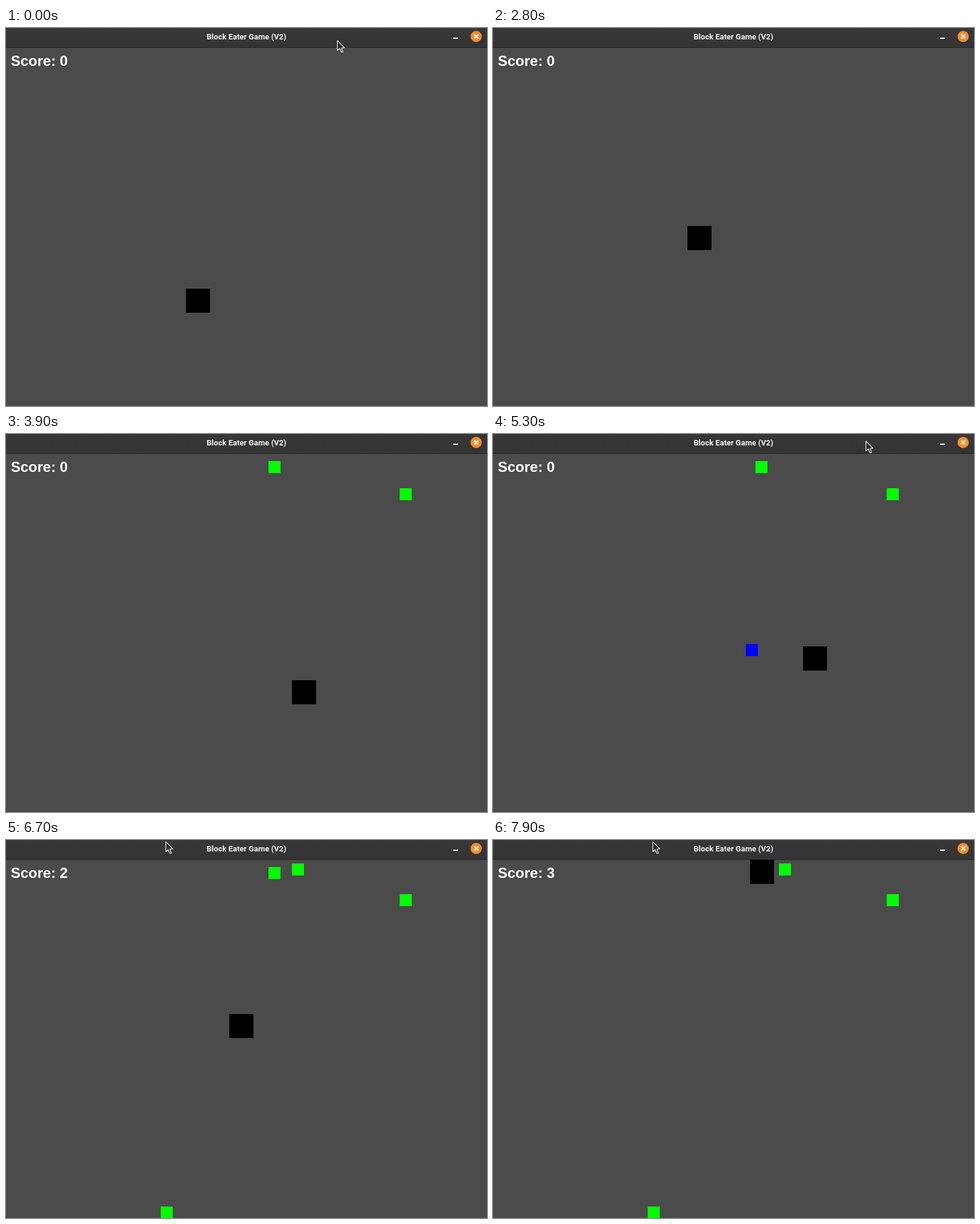
Animation, 799 px wide and 628 px high, one loop 8000 ms. Source, as an HTML page:

```html
<!DOCTYPE html>
<html lang="en">
<head>
<meta charset="utf-8">
<title>Block Eater Game (V2)</title>
<style>
  html, body { margin: 0; width: 100%; height: 100%; overflow: hidden; background: #4b4b4b; }
  svg { display: block; width: 799px; height: 628px; }
  .title { font: 600 13px Roboto, "Open Sans", sans-serif; text-anchor: middle; }
  .score { font: bold 24px "Liberation Sans", Arial, sans-serif; }
</style>
</head>
<body>
<svg viewBox="0 0 799 628">
  <defs>
    <linearGradient id="bar" x2="0" y2="1">
      <stop stop-color="#383838"/>
      <stop offset="1" stop-color="#343434"/>
    </linearGradient>
  </defs>
  <rect width="799" height="628" fill="#4b4b4b"/>
  <rect width="799" height="32" fill="url(#bar)"/>
  <rect y="32" width="799" height="1" fill="#242424"/>
  <text class="title" x="399.5" y="19" fill="#f4f4f4">Block Eater Game (V2)</text>
  <rect x="743" y="16" width="8" height="2" fill="#fff"/>
  <circle cx="781" cy="14" r="9.3" fill="#f68b2c"/>
  <path d="M777.7 10.7l6.6 6.6m0-6.6l-6.6 6.6" stroke="#fff" stroke-width="2"/>
  <g id="food"></g>
  <rect id="player" width="40" height="40"/>
  <text class="score" id="score" x="8" y="63" fill="#fff"></text>
  <path id="cursor" d="M.5 .8V17.2L4.3 13.8L7 20H9.8L7.3 13.2L12 12.6Z"
        fill="#2b2b2b" stroke="#fff" stroke-width="1.1" stroke-linejoin="round"/>
</svg>
<script>
const LOOP = 8000, FRAME = 100;        // the screen refreshes every FRAME ms
const TICK = 33, STEP = 8;             // a held key moves the player STEP px per TICK
const PLAYER = 40, FOOD = 20;
const $ = id => document.getElementById(id);

const UP = [0, -1], DOWN = [0, 1], LEFT = [-1, 0], RIGHT = [1, 0];
const hold = (dir, start, steps) => ({ dir, start, steps });
const keys = [
  hold(UP, 100, 13), hold(RIGHT, 2670, 19),
  hold(DOWN, 3460, 10), hold(RIGHT, 3790, 8), hold(UP, 4350, 7),
  hold(LEFT, 5850, 18), hold(DOWN, 6210, 2), hold(UP, 6360, 42), hold(RIGHT, 7660, 7)
];

function playerAt(t) {
  let x = 299, y = 433;
  for (const { dir, start, steps } of keys) {
    const n = Math.min(steps, Math.max(0, Math.floor((t - start) / TICK)));
    x += dir[0] * n * STEP;
    y += dir[1] * n * STEP;
  }
  return { x, y };
}

// the first two appear together, the others one interval apart
const bornAt = i => 2650 + 950 * Math.max(1, i);
const makeFood = (x, y, color = "#0f0", points = 1) => ({ x, y, color, points });
const foods = [
  makeFood(436, 45), makeFood(654, 90), makeFood(420, 349, "#00f", 2),
  makeFood(257, 609), makeFood(475, 39)
];

const overlaps = (p, f) =>
  p.x < f.x + FOOD && f.x < p.x + PLAYER && p.y < f.y + FOOD && f.y < p.y + PLAYER;

function eatenAt(f) {
  for (let t = 0; t < LOOP; t += FRAME) {
    if (t >= f.born && overlaps(playerAt(t), f)) return t;
  }
  return LOOP;
}

function setAttrs(el, attrs) {
  for (const key in attrs) el.setAttribute(key, attrs[key]);
}

const show = (el, on) => el.setAttribute("visibility", on ? "visible" : "hidden");

foods.forEach((f, i) => {
  f.born = bornAt(i);
  f.eaten = eatenAt(f);
  f.el = document.createElementNS("http://www.w3.org/2000/svg", "rect");
  setAttrs(f.el, { x: f.x, y: f.y, width: FOOD, height: FOOD, fill: f.color });
  $("food").append(f.el);
});

// pointer jumps; it is hidden between its first exit and its return
const EXIT = 200, RETURN = 4800;
const jumps = [
  { at: 0, x: 550, y: 20 }, { at: RETURN, x: 778, y: 0 },
  { at: 5300, x: 619, y: 11 }, { at: 5400, x: 385, y: 4 },
  { at: 5500, x: 152, y: 0 }, { at: 5900, x: 265, y: 2 }
];

function render(time) {
  const t = Math.floor((time % LOOP) / FRAME) * FRAME;
  setAttrs($("player"), playerAt(t));

  let score = 0;
  for (const f of foods) {
    if (t >= f.eaten) score += f.points;
    show(f.el, t >= f.born && t < f.eaten);
  }
  $("score").textContent = "Score: " + score;

  const { x, y } = jumps.findLast(j => j.at <= t);
  setAttrs($("cursor"), { transform: `translate(${x} ${y})` });
  show($("cursor"), t < EXIT || t >= RETURN);
}

const begin = performance.now();
function loop() {
  render(performance.now() - begin);
  requestAnimationFrame(loop);
}
loop();
</script>
</body>
</html>
```
